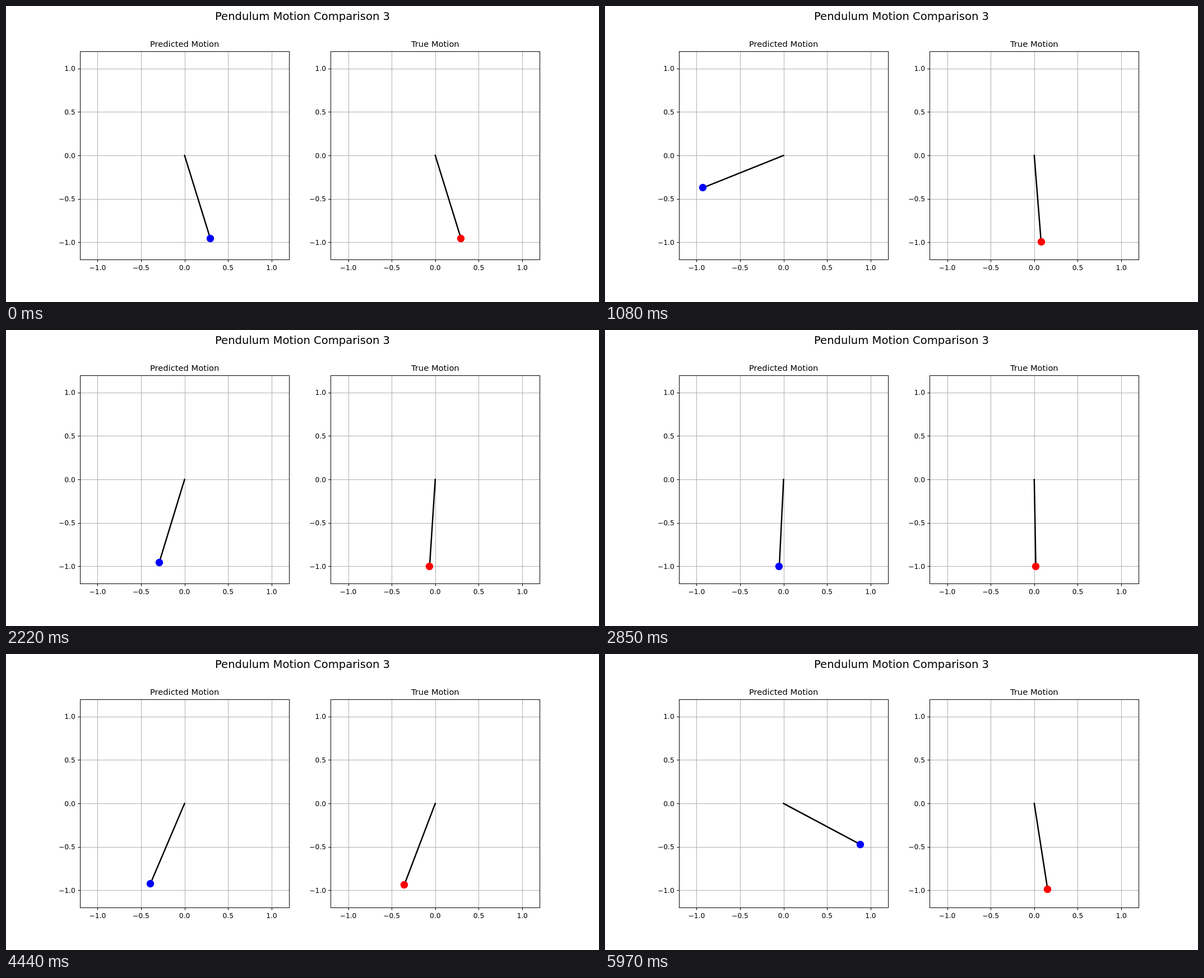
An HTML page with a canvas that plays this animation: 1058x529 px, repeating every 6000 ms.

```html
<!DOCTYPE html>
<html lang="en">
<head>
<meta charset="utf-8">
<title>Pendulum Motion Comparison</title>
<style>
html, body { margin: 0; width: 100%; height: 100%; overflow: hidden; background: #fff; }
canvas { display: block; width: 1058px; height: 529px; }
</style>
</head>
<body>
<canvas id="stage" width="1058" height="529"></canvas>
<script>
const ctx = document.getElementById('stage').getContext('2d');
const STEP = 30, STEPS = 200;
const SIZE = 372.7, UNIT = SIZE / 2.4, PT = 88.17 / 72;
const CY = 267.145;
const PANELS = [
  { title: 'Predicted Motion', cx: 318.602, color: '#0000ff', angle: predicted },
  { title: 'True Motion', cx: 765.845, color: '#ff0000', angle: actual }
];
const TICKS = [-1, -0.5, 0, 0.5, 1];

// Phase of the predicted swing: [step, radians], linear in between
const PHASE = [[0, -0.305], [36, 9.801], [74, 20.617], [116, 32.786],
               [148, 42.113], [167, 47.468], [199, 56.72]];

function phaseAt(n) {
  let i = 1;
  while (i < PHASE.length - 1 && n > PHASE[i][0]) i++;
  const [n0, p0] = PHASE[i - 1], [n1, p1] = PHASE[i];
  return p0 + (p1 - p0) * (n - n0) / (n1 - n0);
}

// Amplitude grows to a plateau, then fades slowly
function predicted(n) {
  const plateau = 1.318 - 0.115 * (n / 190) ** 2;
  const amp = plateau / Math.sqrt(1 + 13.8 * Math.exp(-0.15 * n));
  return amp * (0.96 * Math.cos(phaseAt(n)) - 0.04);
}

function actual(n) {
  return 0.385 * Math.cos(0.15545 * n - 0.677);
}

const snap = v => Math.floor(v + 0.5) + 0.5;

function line(x0, y0, x1, y1) {
  ctx.beginPath();
  ctx.moveTo(x0, y0);
  ctx.lineTo(x1, y1);
  ctx.stroke();
}

function text(str, x, y, points, align) {
  ctx.font = `${points * PT}px "DejaVu Sans", sans-serif`;
  ctx.textAlign = align;
  ctx.fillStyle = '#000';
  ctx.fillText(str, x, y);
}

function drawPanel({ title, cx, color, angle }, n) {
  const left = snap(cx - SIZE / 2), right = snap(cx + SIZE / 2);
  const top = snap(CY - SIZE / 2), bottom = snap(CY + SIZE / 2 - 0.01);
  const tick = 3.5 * PT;

  ctx.lineCap = 'butt';
  ctx.lineWidth = 1;
  for (const v of TICKS) {
    const x = snap(cx + v * UNIT), y = snap(CY - v * UNIT);
    const label = v.toFixed(1).replace('-', '\u2212');
    ctx.strokeStyle = '#b0b0b0';
    line(x, top, x, bottom);
    line(left, y, right, y);
    ctx.strokeStyle = '#000';
    line(x, bottom, x, bottom + tick);
    line(left, y, left - tick, y);
    text(label, cx + v * UNIT, 472, 10, 'center');
    text(label, cx - SIZE / 2 - 2 * tick, Math.round(CY - v * UNIT + 4.5), 10, 'right');
  }

  const a = angle(n);
  const x = cx + UNIT * Math.sin(a), y = CY + UNIT * Math.cos(a);
  ctx.lineCap = 'square';
  ctx.lineWidth = 2 * PT;
  line(cx, CY, x, y);
  ctx.fillStyle = color;
  ctx.beginPath();
  ctx.arc(Math.floor(x) + 0.5, Math.floor(y) + 0.5, 5.5 * PT, 0, 2 * Math.PI);
  ctx.fill();

  ctx.lineWidth = 1;
  ctx.strokeRect(left, top, right - left, bottom - top);
  text(title, cx, 73, 12, 'center');
}

function draw(now) {
  const n = Math.floor(now / STEP) % STEPS;
  ctx.fillStyle = '#fff';
  ctx.fillRect(0, 0, 1058, 529);
  text('Pendulum Motion Comparison 3', 529, 25, 16, 'center');
  for (const panel of PANELS) drawPanel(panel, n);
}

const start = performance.now();
function loop() {
  draw(performance.now() - start);
  requestAnimationFrame(loop);
}
loop();
</script>
</body>
</html>
```
